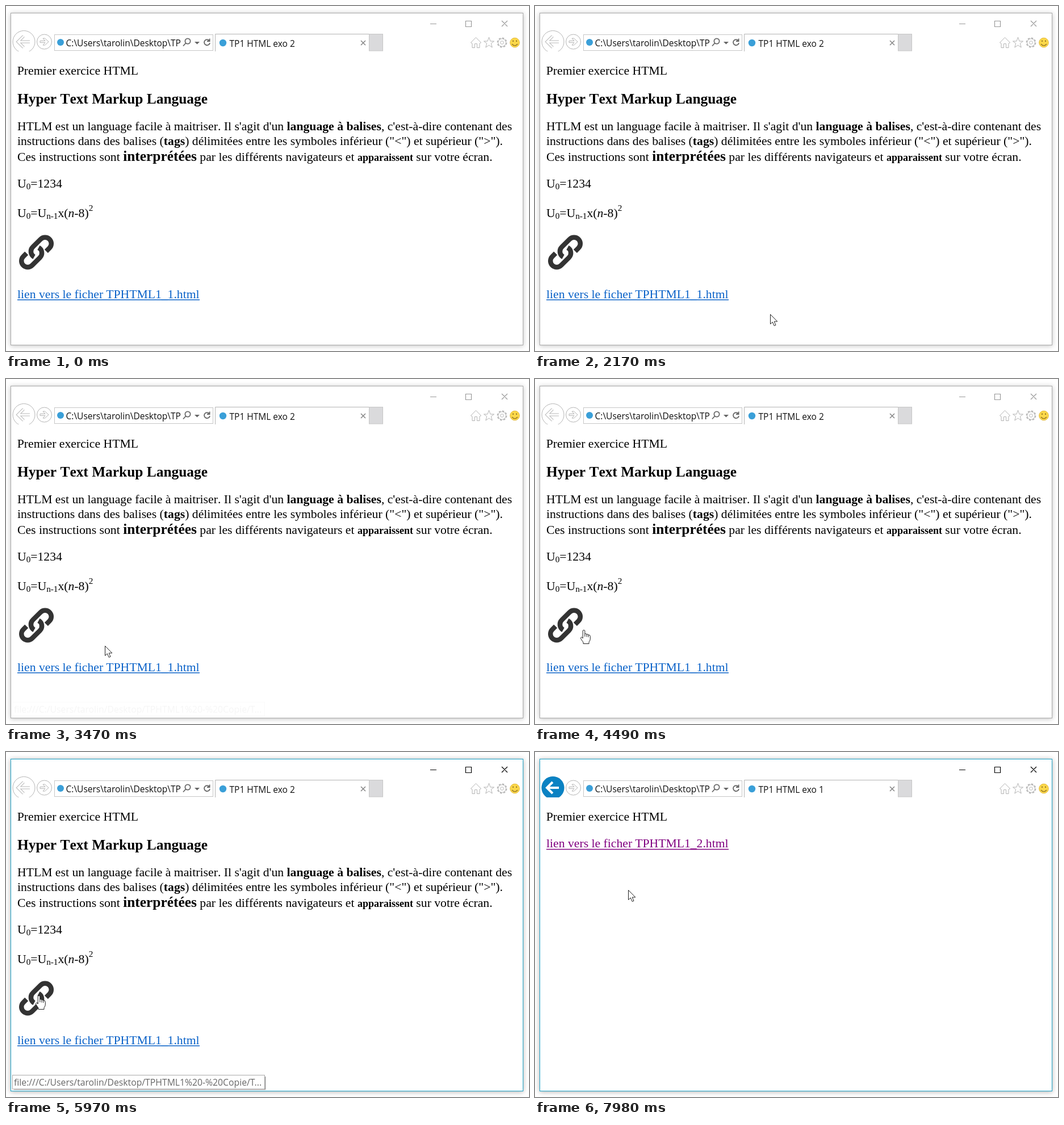
Animation, 921 px wide and 608 px high, one loop 8000 ms. Source, as an HTML page:

```html
<!DOCTYPE html>
<html lang="fr">
<meta charset="utf-8">
<title>TP1 HTML</title>
<style>
  html, body { margin: 0; width: 100%; height: 100%; overflow: hidden; background: #fff }
  svg { display: block }
  text { white-space: pre; font-kerning: none }
  .ui { font: 15.5px "Open Sans", sans-serif; fill: #111 }
  .doc { font: 21.7px "Liberation Serif", "Times New Roman", serif }
  .b { font-weight: bold }
  .big { font-size: 25.4px }
  .small { font-size: 18px }
  .idx { font-size: 15.2px }
  .line { fill: none; stroke: #b4b4b4 }
  .tool { fill: none; stroke: #666; stroke-width: 1.8 }
  .link { fill: #0a62c8; stroke: #0a62c8 }
  .visited { fill: #800080; stroke: #800080 }
  .link text, .visited text { stroke: none }
  .cursor { fill: #fff; stroke: #222; stroke-linejoin: round }
</style>
<svg width="921" height="608" viewBox="0 0 921 608">
  <defs>
    <path id="arrowLeft" d="M42 63H22M31 53L21 63L31 73"/>
    <path id="chainLink" d="M8.6 -3A11 11 0 0 1 -2 11H-21.6A11 11 0 0 1 -21.6 -11H-13.5"/>
  </defs>

  <rect id="frame" x="8.5" y="12.5" width="902" height="585" fill="#fff"/>

  <path id="controls" fill="none" stroke-width="1.2" d="M747 31.5H758M809.5 26.5H819.5V36.5H809.5ZM873 26L883 36M883 26L873 36"/>

  <circle class="line" cx="31.5" cy="63" r="19.5"/>
  <g fill="none">
    <use href="#arrowLeft" stroke="#b8b8b8" stroke-width="5"/>
    <use href="#arrowLeft" stroke="#fff" stroke-width="3"/>
  </g>
  <g id="back">
    <circle cx="31.5" cy="63" r="20" fill="#0a82c3"/>
    <use href="#arrowLeft" fill="none" stroke="#fff" stroke-width="4"/>
  </g>
  <g class="line">
    <circle cx="67.5" cy="63" r="13"/>
    <path d="M60 61.5H69L65 57H68.5L75 63L68.5 69H65L69 64.5H60Z"/>
  </g>
  <rect x="9" y="80" width="901" height="517" fill="#fff"/>

  <rect x="85.5" y="50.5" width="279" height="28" fill="#fff" stroke="#c6c6c6"/>
  <circle cx="96" cy="64" r="6" fill="#3a9fd8"/>
  <text class="ui" x="105.5" y="70.5">C:\Users\tarolin\Desktop\TP</text>
  <g class="tool">
    <circle cx="320" cy="62" r="4.6"/>
    <path d="M316.5 65.5L312 70.5"/>
    <path d="M358 61A5 5 0 1 0 359 65M358.6 57.5V62H354"/>
  </g>
  <path d="M332 63H341L336.5 67.5Z" fill="#666"/>

  <path class="line" d="M368.5 80V49.5H640"/>
  <rect x="639.5" y="49.5" width="24" height="29.5" fill="#dadadc" stroke="#c6c6c6"/>
  <circle cx="382" cy="65" r="6.2" fill="#3a9fd8"/>
  <text id="tab" class="ui" x="393.5" y="71.5"></text>
  <path fill="none" stroke="#888" stroke-width="1.6" d="M625 61L633 69M633 61L625 69"/>

  <g class="line">
    <path d="M818.5 64.5L827.5 55.5L836.5 64.5L834 66V73.5H829.5V66.5H825.5V73.5H821V66Z"/>
    <path d="M850.5 55L853 62H859.5L854.3 66L856.2 73L850.5 69L844.8 73L846.7 66L841.5 62H848Z"/>
    <circle cx="873.5" cy="64.5" r="8" stroke-width="1.8" stroke-dasharray="3.6 2.68"/>
    <circle cx="873.5" cy="64.5" r="6.8"/>
    <circle cx="873.5" cy="64.5" r="2.8"/>
  </g>
  <circle cx="896" cy="64.5" r="8.3" fill="#fbd84a" stroke="#e3b93a"/>
  <path d="M891 67Q896 72.5 901 67" fill="none" stroke="#8a6a20" stroke-width="1.2"/>
  <path d="M893 60.5V63M899 60.5V63" stroke="#8a6a20" stroke-width="1.6"/>

  <text class="doc" x="19.8" y="121.3">Premier exercice HTML</text>

  <g id="second">
    <g class="doc">
      <text class="b big" x="20" y="171.8">Hyper Text Markup Language</text>
      <text x="20" y="219.3">HTLM est un language facile à maitriser. Il s'agit d'un <tspan class="b">language à balises</tspan>, c'est-à-dire contenant des</text>
      <text x="20" y="244.6">instructions dans des balises (<tspan class="b">tags</tspan>) délimitées entre les symboles inférieur ("&lt;") et supérieur ("&gt;").</text>
      <text x="20" y="272.8">Ces instructions sont <tspan class="b big">interprétées</tspan> par les différents navigateurs et <tspan class="b small">apparaissent</tspan> sur votre écran.</text>
      <text x="20" y="320">U<tspan class="idx" dy="3">0</tspan><tspan dy="-3">=1234</tspan></text>
      <text x="20" y="372">U<tspan class="idx" dy="3">0</tspan><tspan dy="-3">=U</tspan><tspan class="idx" dy="3">n-1</tspan><tspan dy="-3">x(</tspan><tspan font-style="italic">n</tspan>-8)<tspan class="idx" dy="-11">2</tspan></text>
    </g>
    <g transform="translate(53.5 434) rotate(-45)" fill="none" stroke="#333" stroke-width="8.5">
      <use href="#chainLink"/>
      <use href="#chainLink" transform="rotate(180)"/>
    </g>
    <g class="link">
      <text class="doc" x="20" y="515">lien vers le ficher TPHTML1_1.html</text>
      <path d="M20 517.7H341" stroke-width="1.5"/>
    </g>
  </g>

  <g id="first" class="visited">
    <text class="doc" x="20" y="168.3">lien vers le ficher TPHTML1_2.html</text>
    <path d="M20 171.5H341" stroke-width="1.5"/>
  </g>

  <path id="statusShadow" d="M14 594.5H456.5V572" fill="none" stroke="#8c8c8c" stroke-width="1.3"/>
  <g id="status">
    <rect x="11.5" y="569.5" width="444" height="24.5" fill="#fff" stroke="#aaa"/>
    <text class="ui" x="14" y="588" style="font-size:15.75px;fill:#666">file:///C:/Users/tarolin/Desktop/TPHTML1%20-%20Copie/T...</text>
  </g>

  <g id="cursor" class="cursor">
    <path id="pointer" d="M.5 .5V17.5L4.3 14L7.2 20.5L10 19.3L7.2 13H12.8Z"/>
    <path id="hand" d="M-1.8 14V2Q-1.8 .5 0 .5T1.8 2V7Q4.2 6 5 8Q7.3 7 8 9Q11.3 8.5 11.3 11.5V16Q11.3 19 9 21.5V24.5H-1V22Q-3 19.5-5.3 15.5Q-6 13.5-4.5 13T-1.8 15ZM1.8 7V12M5 8V12.5M8 9V13"/>
  </g>
</svg>
<script>
  const LOOP = 8000;
  const CLICK = 5970, SWAP = 6110;
  const path = [ // time, x, y of the cursor's hot spot
    [990, 632, 606], [1470, 582, 581], [1760, 514, 561], [2540, 365, 535],
    [2920, 365, 535], [3050, 284, 517], [3750, 119, 446], [3830, 105, 442],
    [4270, 105, 442], [4490, 86, 442], [4980, 58, 429], [7340, 58, 429], [7980, 164, 243]
  ];
  const $ = id => document.getElementById(id);
  const show = (id, on) => $(id).setAttribute('opacity', +on);
  const ramp = (t, from, to) => Math.min(1, Math.max(0, (t - from) / (to - from)));

  const slope = (i, axis) => (path[i + 1][axis] - path[i][axis]) / (path[i + 1][0] - path[i][0]);
  function tangent(i, axis) {
    if (i === 0) return slope(0, axis);
    const a = slope(i - 1, axis);
    if (i === path.length - 1) return a;
    const b = slope(i, axis);
    return a * b > 0 ? 2 * a * b / (a + b) : 0;
  }

  // Monotone cubic through the path points
  function cursorAt(t, axis) {
    t = Math.min(Math.max(t, path[0][0]), path.at(-1)[0]);
    let i = 0;
    while (i < path.length - 2 && t >= path[i + 1][0]) i++;
    const span = path[i + 1][0] - path[i][0], u = (t - path[i][0]) / span, v = 1 - u;
    return v * v * (1 + 2 * u) * path[i][axis] + u * u * (3 - 2 * u) * path[i + 1][axis]
      + span * u * v * (v * tangent(i, axis) - u * tangent(i + 1, axis));
  }

  function render(t) {
    const x = cursorAt(t, 1), y = cursorAt(t, 2);
    const active = t >= CLICK, swapped = t >= SWAP;
    const overLink = y >= 497 && y <= 520 && x <= 341;
    const overImage = y >= 400 && y <= 466 && x <= 88;
    const hovering = !swapped && (overLink || overImage);

    $('frame').setAttribute('stroke', active ? '#1ba1c5' : '#a8a8a8');
    $('frame').style.filter = `drop-shadow(0 1px 4px rgba(0,0,0,${active ? .32 : .25}))`;
    $('controls').setAttribute('stroke', active ? '#000' : '#999');
    $('tab').textContent = 'TP1 HTML exo ' + (swapped ? 1 : 2);
    show('second', !swapped);
    show('first', swapped);
    show('back', ramp(t, 6130, 6280));

    const fade = t < 4000
      ? ramp(t, 3060, 3220) * (1 - ramp(t, 3320, 3480))
      : ramp(t, 4540, 4720) * (1 - ramp(t, 6020, SWAP));
    show('status', fade);
    show('statusShadow', (t >= 3030 && t < 3440) || (t >= 4510 && t < 6080));

    show('cursor', t >= path[0][0]);
    $('cursor').setAttribute('transform', `translate(${Math.round(x)} ${Math.round(y)})`);
    show('hand', hovering);
    show('pointer', !hovering);
  }

  const start = performance.now();
  function tick() {
    render((performance.now() - start) % LOOP);
    requestAnimationFrame(tick);
  }
  tick();
</script>
</html>
```
